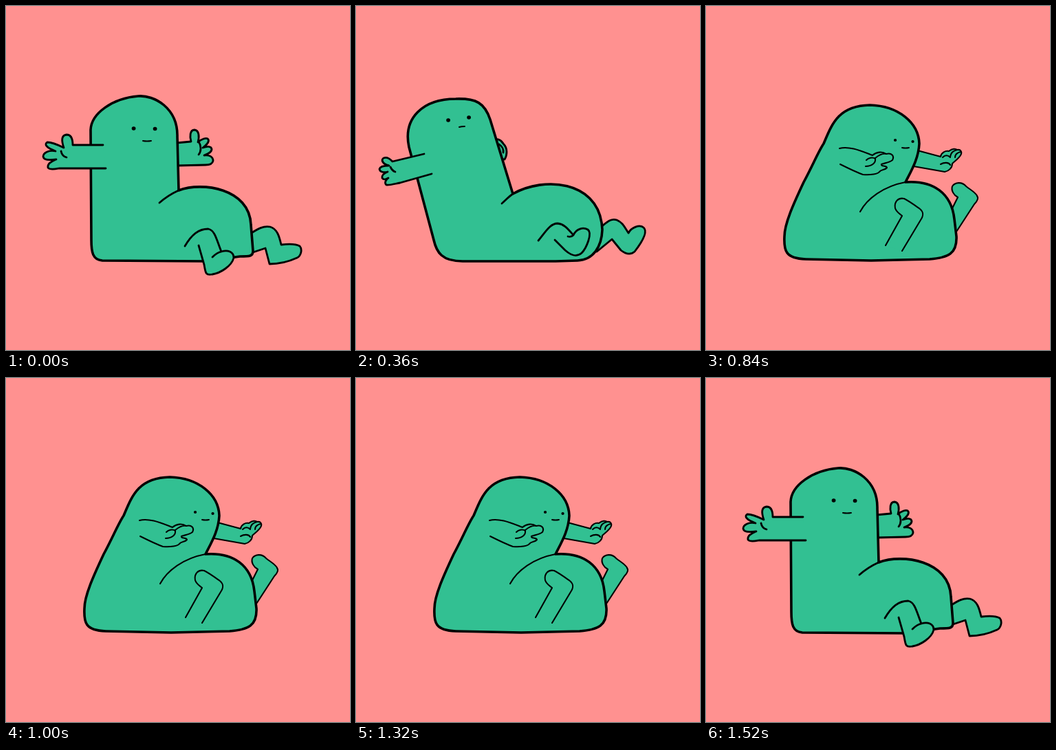
An HTML page without scripts that plays this animation: 500x500 px, repeating every 2.36 s.

```html
<!DOCTYPE html>
<html lang="en">
<head>
<meta charset="utf-8">
<title>Sit-up</title>
<style>
html, body { margin: 0; width: 100%; height: 100%; overflow: hidden; background: #ff9190; }
svg { display: block; width: 100%; height: 100%; }

path {
  d: var(--sit);
  fill: #32c092; stroke: #000; stroke-width: var(--pen);
  stroke-linecap: round; stroke-linejoin: round;
  animation: pose 2360ms infinite;
}
.line { fill: none; }
#figure { --pen: 2.8px; transform-origin: 240px 370px; animation: strain 2360ms step-end infinite; }

/* Poses are held on twos: steps() draws the in-betweens. */
@keyframes pose {
  0% { d: var(--sit); }
  8.47% { d: var(--sit); animation-timing-function: steps(3, start); }
  18.64% { d: var(--lean); animation-timing-function: steps(2, start); }
  25.42% { d: var(--back); }
  35.59% { d: var(--back); animation-timing-function: steps(1, start); }
  59.32% { d: var(--curl); animation-timing-function: steps(1, start); }
  100% { d: var(--sit); }
}
/* Trembling while curled up, then a small overshoot when falling back. */
@keyframes strain {
  0%, 64.4%, 100% { --pen: 2.8px; transform: none; }
  35.59%, 42.37%, 49.15%, 55.93% { --pen: 2.1px; transform: none; }
  38.98%, 45.76%, 52.54% { --pen: 2.1px; transform: skewX(-.8deg); }
  59.32% { --pen: 2.8px; transform: skewX(2.2deg); }
}

#far-arm {
  --sit: path("M248 199 L269 197 C267 190 267 180 274 180 C281 181 281 190 279 198 C283 194 292 190 294 194 C296 198 291 202 286 206 C291 204 298 203 299 208 C299 213 293 215 288 217 C295 216 301 219 301 225 C300 230 296 231 290 231 L248 232 M280 197 C284 203 284 211 280 216");
  --lean: path("M195 193 L207 194 C210 195 213 198 214 200 C217 203 219 207 219 212 C219 216 218 220 216 223 C214 223 212 222 210 222 C208 222 206 221 204 221 C202 220 200 219 198 218 C196 217 195 216 195 215 C195 214 195 213 195 213 L195 210 M208 201 C212 204 215 207 214 213");
  --back: path("M0 0");
  --curl: path("M300 208 L341 219 C342 213 348 210 353 211 C358 207 363 207 365 209 C370 208 373 212 370 217 C367 222 362 225 358 229 C358 235 353 240 347 241 L296 232 M344 220 C348 216 352 217 355 220 M355 219 C356 213 360 210 365 209 M362 220 C362 215 366 213 370 212 M341 230 C346 227 353 227 355 231");
}
#far-leg {
  --sit: path("M355 331 C366 324 374 319 384 321 C394 324 397 334 400 347 C408 346 420 345 427 349 C431 354 429 363 423 366 C412 371 396 375 383 375 L377 352 L356 359");
  --lean: path("M355 322 C364 315 370 308 379 311 C388 315 390 321 396 330 C400 322 412 317 418 322 C425 328 415 344 405 357 C398 363 390 359 385 355 L372 339 L350 357");
  --back: path("M360 324 C370 322 380 320 391 322 C398 326 398 340 400 359 C408 357 419 359 421 368 C422 376 418 380 410 381 C400 381 390 381 378 379 L375 350 L360 350");
  --curl: path("M358 294 L366 278 C360 275 356 268 358 262 C362 256 372 255 378 262 C384 267 392 271 394 276 C397 280 393 285 390 288 L364 328");
}
#body {
  stroke-width: 3.6px;
  --sit: path("M140 370 C126 369 124 358 124 340 L123 180 C124 156 155 134 192 131 C215 129 250 148 249 190 L251 268 C285 255 354 265 356 318 L359 356 C359 364 354 364 340 364 L290 371 Z");
  --lean: path("M155 371 C125 371 117 358 113 340 L77 205 C68 163 97 135 145 135 C175 134 187 141 195 165 L228 273 C275 247 348 255 357 315 L358 325 C357 350 345 369 322 370 L290 371 Z");
  --back: path("M142 371 C122 370 113 360 105 343 L64 240 C46 190 88 143 130 143 C153 143 168 156 178 178 L223 275 C275 246 350 260 361 318 L363 345 C363 364 345 369 315 370 L285 371 Z");
  --curl: path("M145 368 C115 367 113 355 114 335 C114 315 130 282 142 256 C155 232 163 212 171 200 C183 172 192 145 238 144 C280 145 309 170 310 200 C309 222 298 240 290 256 C330 253 357 272 361 310 L364 335 C365 360 352 366 325 368 L240 370 Z");
}
#fold {
  --sit: path("M223 286 C231 279 240 273 251 268");
  --lean: path("M212 287 C218 282 222 277 228 273");
  --back: path("M206 287 C211 283 216 278 223 275");
  --curl: path("M224 299 C234 280 258 262 290 256");
}
#eyes {
  stroke-width: calc(2 * var(--pen));
  --sit: path("M185.5 178 l.2 0 M216.5 178.5 l.2 0");
  --lean: path("M134 166 l.2 0 M164 162 l.2 0");
  --back: path("M93.5 167 l.6 0 M122.5 156.5 l.6 0");
  --curl: path("M275 195 l.1 0 M300.5 197 l.1 0");
}
#mouth {
  stroke-width: 2px;
  --sit: path("M199 196 Q205 197 211 196");
  --lean: path("M150 176 Q153 175 158 175");
  --back: path("M111 173 Q117 171 122 169");
  --curl: path("M285 206 Q290 207 295 206");
}
#near-arm {
  --sit: path("M141 202 L97 202 C97 194 95 187 88 187 C81 188 80 194 84 206 C76 202 68 198 60 198 C55 201 59 206 72 211 C63 209 54 213 54 219 C55 225 66 224 73 223 C66 226 60 229 61 235 C64 239 72 237 77 236 L145 236 M80 211 C81 216 84 219 88 220");
  --lean: path("M99 215 L53 226 C50 223 46 219 40 221 C36 224 39 230 48 232 C42 232 35 233 34 237 C35 242 41 242 46 241 C41 243 37 246 38 250 C40 253 44 252 47 250 C43 253 41 257 44 260 C48 261 58 258 64 257 L110 244 M50 234 C52 238 54 240 57 241");
  --back: path("M67 234 L37 255 C33 254 29 250 24 253 C20 256 21 260 32 262 C27 261 21 266 20 270 C22 275 28 272 34 268 C29 272 26 278 29 282 C33 284 36 279 38 276 C34 280 33 285 37 288 C41 289 46 285 50 283 L85 262 M35 262 C36 266 39 267 45 266");
  --curl: path("M194 207 C208 203 226 211 242 217 C248 212 256 211 262 215 C270 213 274 218 271 224 C266 228 260 228 255 230 C254 234 262 231 263 235 C260 239 255 237 252 241 C250 244 240 246 228 245 C217 241 205 235 195 230 M232 233 C241 233 247 228 246 222 C242 219 236 221 233 224 M246 221 C251 217 257 214 262 215");
}
#near-leg {
  --sit: path("M260 349 C270 332 280 324 294 324 C304 326 306 340 313 357 C322 354 331 357 331 366 C328 378 312 388 300 390 C290 392 290 388 288 376 L280 348 M300 365 C304 361 308 358 313 357");
  --lean: path("M265 341 C275 329 282 316 293 316 C303 317 308 324 316 333 C320 324 330 321 337 325 C344 330 335 352 328 359 C320 366 312 362 304 355 L289 340 M308 335 C312 336 314 335 316 333");
  --back: path("M261 346 C270 335 280 324 290 324 C302 326 306 350 312 375 C322 372 331 376 331 386 C331 396 324 398 318 398 C308 396 290 391 286 384 L279 357 M310 375 C311 375 312 375 314 375");
  --curl: path("M261 348 L285 305 C282 302 277 300 275 294 C273 284 280 278 288 280 C296 284 304 290 311 295 C317 300 316 305 312 311 L285 356");
}
</style>
</head>
<body>
<svg viewBox="0 0 500 500">
  <g id="figure">
    <path id="far-arm"/>
    <path id="far-leg"/>
    <path id="body"/>
    <path id="fold" class="line"/>
    <path id="eyes" class="line"/>
    <path id="mouth" class="line"/>
    <path id="near-arm"/>
    <path id="near-leg"/>
  </g>
</svg>
</body>
</html>
```
